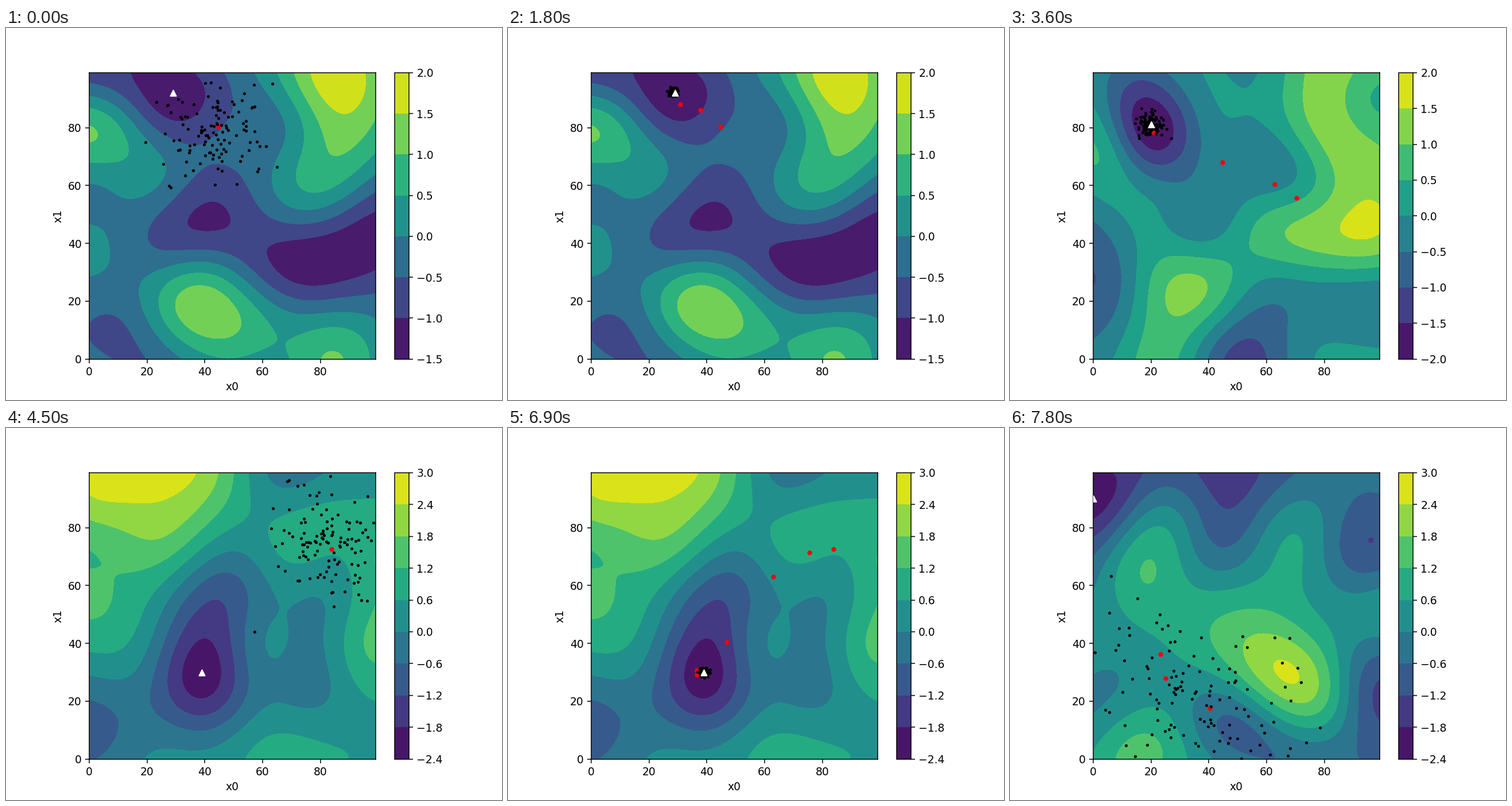
A matplotlib script that plays this animation: 864x648 px, repeating every 8 s.

```python
import numpy as np
import matplotlib.pyplot as plt
from matplotlib.animation import FuncAnimation

SIZE = 100            # grid cells per side
LENGTH = 15.0         # correlation length of the landscapes
POPULATION = 118
FRAME_MS, STEP_MS, LOOP_MS = 100, 300, 8000


def offsets(a, b):
    """Scaled x and y gaps between two point sets, and their Gaussian weight."""
    dx, dy = ((a[:, None] - b) / LENGTH).transpose(2, 0, 1)
    return dx, dy, np.exp(-(dx ** 2 + dy ** 2) / 2)


def landscape(flat, slope):
    """Smooth surface through (x, y, height) keys, level at the flat ones."""
    keys = np.array(flat + slope, float)
    points, tops = keys[:, :2], keys[:len(flat), :2]

    def values(at):
        _, _, k = offsets(at, points)
        fx, fy, fk = offsets(at, tops)
        return np.hstack([k, fx * fk, fy * fk])

    dx, dy, k = offsets(tops, points)
    fx, fy, fk = offsets(tops, tops)
    system = np.vstack([
        values(points),
        np.hstack([-dx * k, (1 - fx ** 2) * fk, -fx * fy * fk]),
        np.hstack([-dy * k, -fx * fy * fk, (1 - fy ** 2) * fk]),
    ])
    goals = np.concatenate([keys[:, 2], np.zeros(2 * len(flat))])
    weights = np.linalg.solve(system + 1e-3 * np.eye(len(goals)), goals)
    grid = np.stack(np.meshgrid(np.arange(SIZE), np.arange(SIZE)), -1).reshape(-1, 2)
    return (values(grid) @ weights).reshape(SIZE, SIZE)


def population(mean, step, spread, rng):
    """Gaussian cloud stretched along the last step, kept inside the plot."""
    dots = spread * rng.standard_normal((4 * POPULATION, 2))
    if step.any():
        along = step / np.hypot(*step)
        dots += 1.2 * np.outer(dots @ along, along)
    dots += mean
    inside = ((dots >= 0) & (dots <= SIZE - 1)).all(1)
    return dots[inside][:POPULATION]


class Scene:
    def __init__(self, levels, goal, generations, path, flat, slope):
        # The mean follows the path and rests at its end.
        stops = np.minimum(np.arange(generations), len(path) - 1)
        self.means = np.array(path, float)[stops]
        steps = np.diff(self.means, axis=0, prepend=self.means[:1])
        rng = np.random.default_rng(generations)
        self.clouds = []
        for g in range(generations):
            # The search widens at first, then shrinks geometrically.
            spread = min(10 * 1.15 ** g, 0.7 * 1.85 ** (generations - 1 - g))
            self.clouds.append(population(self.means[g], steps[g], spread, rng))

        self.ax = fig.add_subplot()
        self.ax.set_aspect("equal")
        field = np.clip(landscape(flat, slope), levels[0] + 1e-3, levels[-1] - 1e-3)
        filled = self.ax.contourf(field, levels=levels)
        self.bar = fig.colorbar(filled, ax=self.ax)
        self.ax.set(xlabel="x0", ylabel="x1", xlim=(0, SIZE - 1), ylim=(0, SIZE - 1))
        self.trail = self.ax.scatter([], [], s=12, c="red", zorder=2)
        self.dots = self.ax.scatter([], [], s=3, c="black", zorder=3)
        self.ax.scatter(*goal, s=30, c="white", marker="^", zorder=4)

    def show(self, generation):
        visible = 0 <= generation < len(self.means)
        self.ax.set_visible(visible)
        self.bar.ax.set_visible(visible)
        if visible:
            self.trail.set_offsets(self.means[:generation + 1])
            self.dots.set_offsets(self.clouds[generation])


fig = plt.figure(figsize=(6.4, 4.8), dpi=135)
wide = np.linspace(-2.4, 3, 10).round(1)
scenes = [
    Scene(
        np.arange(-1.5, 2.1, 0.5), goal=(29, 92), generations=7,
        path=[(44.6, 80.3), (37.8, 86), (30.8, 88), (28.4, 92.3)],
        flat=[(29, 92, -1.4), (86, 98, 1.9), (-2, 78, 1.08), (40, 17, 1.43),
              (80, 34, -1.4), (41, 71, -.45), (-1, 37, .1), (0, 55, -.12),
              (8, 8, -.62), (66.5, 6, .49), (84, -2, 1.08)],
        slope=[(99, 46, -1.25), (45, 48.5, -1.08), (25, 44, -.7), (0, 95.4, -.5),
               (20, 57, 0), (20, 0, -.5), (52, 99, -.25), (68, 79, 0), (75, 58, .5),
               (88, 71, 1), (99, 64, 0), (99, 14, 0), (59, 22.6, 0)]),
    Scene(
        np.arange(-2.0, 2.1, 0.5), goal=(20, 81), generations=8,
        path=[(70.2, 55.7), (62.8, 60.5), (44.6, 68), (21, 78.4), (20, 81)],
        flat=[(20.5, 81, -1.95), (52, -3, -1.3), (-1, 28, -1.02), (32, 23, 1.22),
              (94, 47, 1.65), (80, 87, 1.25), (100, 90, .42), (-1, 72, .56),
              (15, 52, .12), (78, 18, -.35), (51, 35, .43)],
        slope=[(90, 65, 1.3), (51, 84, 0), (70, 62, 0), (37, 40.5, 0), (66.4, 44, 1),
               (22, 0, .75), (99, 0, .12), (57, 99, 0), (88, 99, 1.1), (14, 96, -1),
               (7, 0, 0), (99, 32, .5), (29, 61, -.5)]),
    Scene(
        wide, goal=(39, 30), generations=9,
        path=[(83.8, 72.5), (75.5, 71.4), (63, 63), (46.9, 40.4), (36.6, 29.1),
              (36.6, 30.7), (39, 30)],
        flat=[(39, 30, -2.2), (28, 101, 2.65), (-2, 56, 1.35), (67, -1, .9),
              (75, 28, -.3), (87, 80, .78), (101, 42, 1.4), (99, 13, .5)],
        slope=[(0, 93, 2.45), (2, 71, 1.2), (25, 76.5, 1.8), (0, 29, 0), (0, 15, -.85),
               (28, 3.5, 0), (63, 35, 0), (81, 54.5, 0), (75, 68, .6), (99, 73, 1.19),
               (99, 90, .6), (67, 99, -.3), (50, 99, 1.2), (51, 63.5, -.6),
               (45, 55, -1.2), (24, 35, -.6), (55, 24, -.6)]),
    Scene(
        wide, goal=(0, 90), generations=10,
        path=[(23.2, 36.2), (25, 27.9), (40.3, 17.6)],
        flat=[(0, 91, -2.15), (47, 99, -1.5), (96, 75.6, -1.21), (67, 30, 2.5),
              (19, 65, 1.25), (16, 1, 1.45), (50, 9, -.8), (-1, 21, -.1),
              (101, 21, -1.4)],
        slope=[(27, 99, -.95), (24, 87.4, 0), (45, 73, -.6), (42, 58, .6),
               (70.5, 77.5, .6), (70, 98, -.57), (86.5, 83, -.6), (99, 95, -.5),
               (99, 59, 0), (76, 52, .6), (88, 19, 0), (77, 6, 0), (41, 23, 0),
               (25, 39.5, .6), (8, 63, .6), (41.5, 39.5, 1.2)]),
]


def update(frame):
    generation = frame * FRAME_MS // STEP_MS
    for scene in scenes:
        scene.show(generation)
        generation -= len(scene.means)
    return []


anim = FuncAnimation(fig, update, frames=LOOP_MS // FRAME_MS, interval=FRAME_MS,
                     repeat=True, repeat_delay=0, blit=False)
plt.show()
```
